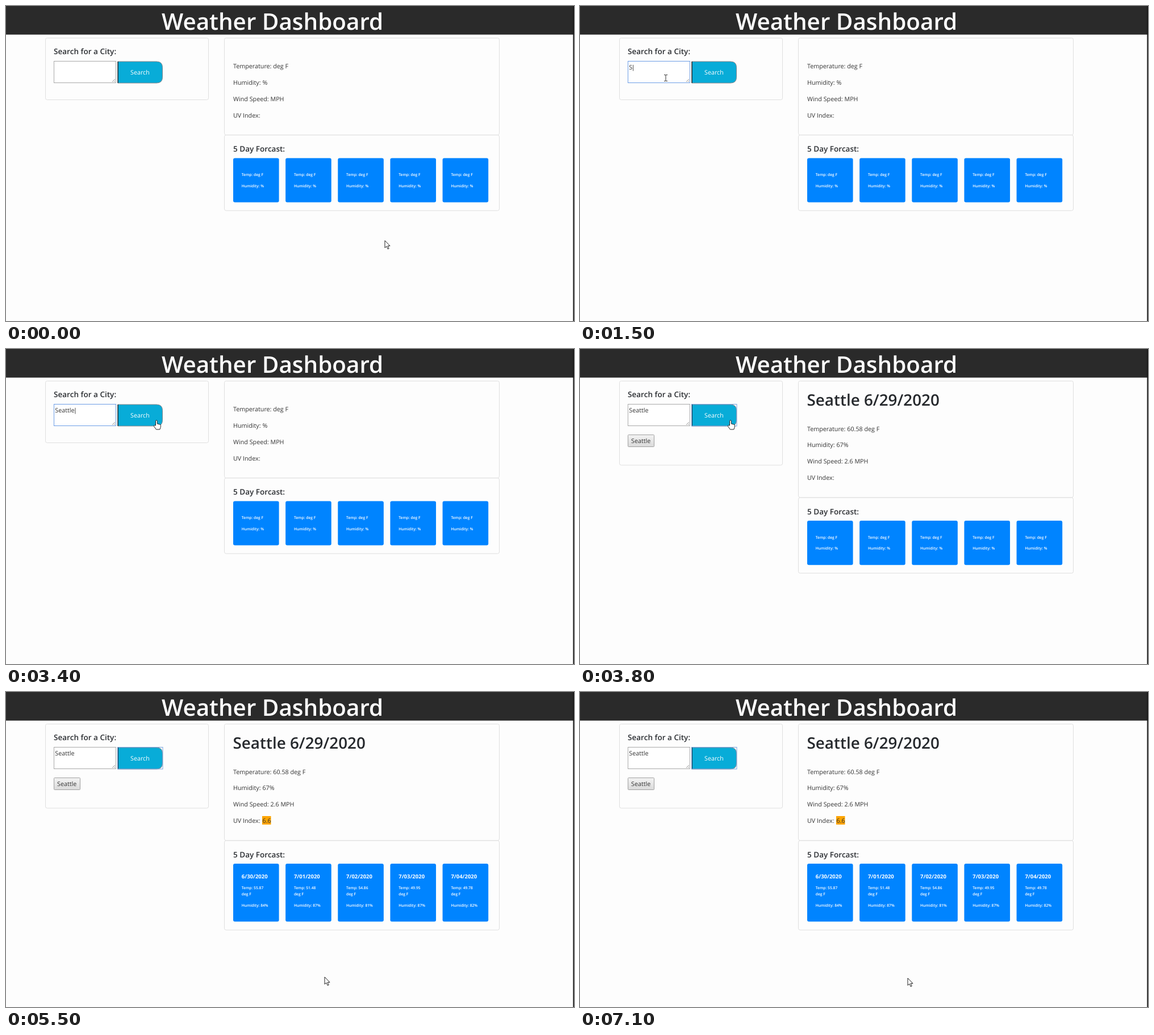
An HTML page that plays this animation: 1000x556 px, repeating every 7.2 s.

```html
<!DOCTYPE html>
<html lang="en">
<head>
<meta charset="utf-8">
<title>Weather Dashboard</title>
<style>
  html, body { margin: 0; width: 100%; height: 100%; overflow: hidden; background: #fdfdfd; }
  svg {
    display: block; width: 1000px; height: 556px;
    font-family: "Open Sans", "Noto Sans", sans-serif; text-rendering: geometricPrecision;
  }
  .title { font-size: 40.4px; font-weight: 600; fill: #fff; }
  .city { font-size: 27.85px; font-weight: 600; fill: #26292d; }
  .head { font-size: 13.55px; font-weight: 600; fill: #2b2e32; }
  .body { font-size: 10.75px; fill: #333; }
  .btn { font-size: 10.75px; font-weight: 500; fill: #fff; }
  .date { font-size: 9.5px; font-weight: 700; fill: #fff; }
  .tiny { font-size: 6.7px; font-weight: 600; fill: #fff; }
</style>
</head>
<body>
<svg id="stage" viewBox="0 0 1000 556"></svg>
<script>
const LOOP = 7200, STEP = 100;
const FOCUS = 1000, CLICK = 3500, RESULT = 3600, FORECAST = 3900;
const KEY_TIMES = [1500, 1700, 1800, 2000, 2100, 2200, 2400];
const CITY = 'Seattle';
const DAYS = [
  ['6/30', 55.87, 84], ['7/01', 51.48, 87], ['7/02', 54.86, 81],
  ['7/03', 49.95, 87], ['7/04', 49.78, 82]
];

// Pointer path: time, x, y
const PATH = [
  [0, 667, 414], [100, 640, 388], [200, 560, 295], [300, 440, 155], [400, 310, 62],
  [500, 215, 52], [600, 165, 112], [700, 151, 127], [2700, 151, 127], [3000, 185, 129],
  [3200, 238, 127], [3400, 265, 126], [3900, 265, 126], [4000, 265, 128.5],
  [4300, 265, 128.5], [4600, 310, 195], [5000, 450, 372], [5300, 545, 490],
  [5500, 561, 503], [5900, 571, 504], [6100, 577, 505], [LOOP, 577, 505]
];

const CURSORS = {
  arrow: '<path d="M0 0V12.8L3 10.2 5.2 15 7.2 14.1 5.1 9.4H9Z" fill="#fff" stroke="#222"/>',
  beam: '<path d="M-3-5.5H-1L0-4.8 1-5.5H3M0-4.8V4.8M-3 5.5H-1L0 4.8 1 5.5H3" fill="none" stroke="#333"/>',
  hand: '<path d="M-1.5 9V1.2a1.4 1.4 0 0 1 2.8 0V6l4.2 1q2 .5 2 2.4L7 12.6 5.8 16H-.6L-4.4 10.6q-.8-1.6.6-1.9Z" fill="#fff" stroke="#222"/>'
};

const text = (cls, x, y, s) => `<text class="${cls}" x="${x}" y="${y}">${s}</text>`;
const rect = (x, y, w, h, fill, extra = '') =>
  `<rect x="${x}" y="${y}" width="${w}" height="${h}" fill="${fill}" ${extra}/>`;
const card = (x, y, w, h) => rect(x, y, w, h, '#fdfdfd', 'rx="3" stroke="#dfdfdf"');

function pointer(t) {
  const i = PATH.findIndex(p => p[0] > t);
  const [t0, x0, y0] = PATH[i - 1], [t1, x1, y1] = PATH[i];
  const k = (t - t0) / (t1 - t0);
  const x = x0 + (x1 - x0) * k, y = y0 + (y1 - y0) * k;
  const inRow = y > 97 && y < 137;
  const kind = inRow && x > 84 && x < 194 ? 'beam' : inRow && x > 197 && x < 276 ? 'hand' : 'arrow';
  return `<g transform="translate(${x} ${y})">${CURSORS[kind]}</g>`;
}

function searchPanel(t) {
  const typing = t >= FOCUS && t < CLICK;
  const typed = CITY.slice(0, KEY_TIMES.filter(k => t >= k).length);
  const bar = typing ? '<tspan fill="#111" dx="-1.5">|</tspan>' : '';
  const shape = 'M197 98H265Q275.5 98 275.5 108.5V125.5Q275.5 136 265 136H197Z';
  let s = card(69.5, 56.5, 287, t < RESULT ? 109 : 148.5)
    + text('head', 84, 85, 'Search for a City:')
    + rect(84.5, 97.5, 109, 38, '#fff', `stroke="${typing ? '#6d9ee6' : '#a9a9a9'}"`)
    + '<path d="M187 134l5-5M190 134l2-2" stroke="#777" stroke-width=".8"/>'
    + text('body', 86.3, 112, typed + bar)
    + `<path d="${shape}" fill="#08acd8" stroke="#8b8588"/>`
    + rect(196.4, 98, 1.4, 38, '#142a33')
    + text('btn', 219, 121, 'Search');
  if (t >= CLICK) s += rect(196.5, 97.5, 79.5, 38.5, 'none', 'stroke="#79a5df"');
  if (t >= RESULT) {
    s += rect(84.5, 151.5, 46, 21, 'url(#grey)', 'rx="1" stroke="#a0a0a0"')
      + text('body', 90, 166.3, CITY);
  }
  return s;
}

function weatherPanel(t) {
  const found = t >= RESULT, loaded = t >= FORECAST;
  const dy = found ? 34.6 : 0;
  const lines = found
    ? ['Temperature: 60.58 deg F', 'Humidity: 67%', 'Wind Speed: 2.6 MPH', 'UV Index:']
    : ['Temperature: deg F', 'Humidity: %', 'Wind Speed: MPH', 'UV Index:'];
  let s = card(384.5, 56.5, 484, 171 + dy)
    + card(384.5, 227.8 + dy, 484, loaded ? 157.7 : 133.3)
    + lines.map((line, i) => text('body', 400, 110 + dy + i * 28.85, line)).join('')
    + text('head', 400, 257 + dy, '5 Day Forcast:');
  if (found) s += text('city', 399.5, 100, CITY + ' 6/29/2020');
  if (loaded) s += rect(451, 219, 15.5, 15, '#ffa500') + text('body', 451.5, 231.2, '6.6');
  return s + DAYS.map((day, i) => tile(400 + i * 92.15, 268.4 + dy, loaded && day)).join('');
}

function tile(x, y, day) {
  const tx = x + 14.8;
  const box = rect(x, y, 80.6, day ? 102.2 : 78.2, '#0084ff', 'rx="3"');
  if (!day) return box + text('tiny', tx, y + 31.9, 'Temp: deg F') + text('tiny', tx, y + 51.4, 'Humidity: %');
  const [date, temp, humidity] = day;
  return box + text('date', tx, y + 25.8, date + '/2020')
    + text('tiny', tx, y + 45.4, 'Temp: ' + temp)
    + text('tiny', tx, y + 56.1, 'deg F')
    + text('tiny', tx, y + 75.7, `Humidity: ${humidity}%`);
}

const backdrop = '<linearGradient id="grey" x2="0" y2="1"><stop stop-color="#f3f3f3"/><stop offset="1" stop-color="#dadada"/></linearGradient>'
  + rect(0, 0, 1000, 556, '#fdfdfd') + rect(0, 0, 1000, 50.5, '#2a2a2a')
  + rect(998.4, 0, 1.6, 556, '#151515') + text('title', 274, 42, 'Weather Dashboard');

const stage = document.getElementById('stage');
let shown = -1;
function draw() {
  const t = Math.floor(performance.now() % LOOP / STEP) * STEP;
  if (t !== shown) {
    stage.innerHTML = backdrop + searchPanel(t) + weatherPanel(t) + pointer(t);
    shown = t;
  }
  requestAnimationFrame(draw);
}
draw();
</script>
</body>
</html>
```
